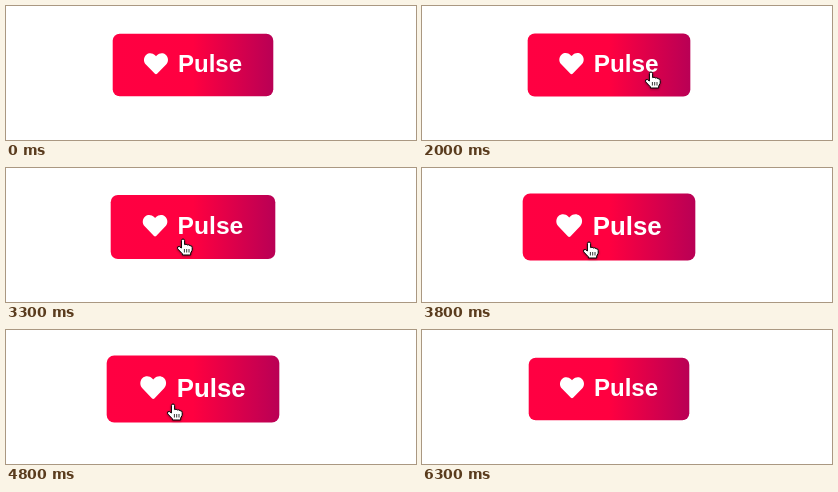
An HTML page that plays this animation: 410x134 px, repeating every 6.8 s.

```html
<!DOCTYPE html>
<html lang="en">
<head>
<meta charset="utf-8">
<title>Pulse button</title>
<style>
  html, body { margin: 0; width: 100%; height: 100%; overflow: hidden; background: #fff; }
  svg { display: block; }
  text { font: bold 24px "Liberation Sans", Arial, sans-serif; fill: #fff; }
</style>
</head>
<body>
<svg width="410" height="134" viewBox="0 0 410 134">
  <defs>
    <linearGradient id="red">
      <stop offset="0" stop-color="#ff0042"/>
      <stop offset=".5" stop-color="#ff0040"/>
      <stop offset="1" stop-color="#b90055"/>
    </linearGradient>
    <filter id="shadow" x="-50%" y="-50%" width="200%" height="200%">
      <feDropShadow dx="0" dy="1" stdDeviation=".8" flood-opacity=".35"/>
    </filter>
  </defs>
  <g id="button">
    <rect x="106.7" y="27.8" width="160.6" height="62.4" rx="7" fill="url(#red)"/>
    <path fill="#fff" transform="translate(138 45.7) scale(.046875)" d="M462.3 62.6C407.5 15.9 326 24.3 275.7 76.2L256 96.5l-19.7-20.3C186.1 24.3 104.5 15.9 49.7 62.6c-62.8 53.6-66.1 149.8-9.9 207.9l193.5 199.8c12.5 12.9 32.8 12.9 45.3 0l193.5-199.8c56.3-58.1 53-154.3-9.8-207.9z"/>
    <text x="172" y="66">Pulse</text>
  </g>
  <g id="arrow" filter="url(#shadow)">
    <path d="M1 1V15.5L4.4 12.3 7 18.3 9.5 17.2 7 11.4H11.5Z" fill="#222" stroke="#fff" stroke-width="2" paint-order="stroke"/>
  </g>
  <g id="hand" filter="url(#shadow)">
    <path d="M-1.6 9V1.6Q-1.6 0 0 0T1.6 1.6V5.6Q3.2 4.6 4.4 6 6 5.2 7 6.7 9.2 6.2 9.2 8.6V11.2L7.7 14V16H-.6V14.8L-5.4 9.8Q-6 7.2-3.8 7.4Z" fill="#fff" stroke="#000" stroke-linejoin="round"/>
    <path d="M1.4 10v3.5M3.7 10v3.5M6 10v3.5" stroke="#000" stroke-width=".8"/>
  </g>
</svg>
<script>
  const LOOP = 6800, STEP = 100;
  const CENTER = { x: 187, y: 59 };
  const POINTER_IN = 700, POINTER_OUT = 6300;
  const HOVER_IN = 1210, HOVER_OUT = 5950;
  const PULSE = 1000, GROWTH = 0.1;

  // Pointer route: time, x, y
  const route = [
    [700, 372, 66], [1100, 284, 78], [1300, 259, 74], [2000, 229, 66],
    [2800, 193, 67], [3600, 167, 73.5], [5500, 167, 73.5], [5600, 160, 77],
    [5700, 150, 75], [5800, 130, 63], [5900, 107, 47], [6100, 54, 13]
  ];
  const [button, arrow, hand] =
    ["button", "arrow", "hand"].map(id => document.getElementById(id));

  const bezier = (a, b, s) =>
    3 * a * s * (1 - s) ** 2 + 3 * b * s * s * (1 - s) + s ** 3;

  // CSS "ease"
  function ease(progress) {
    let low = 0, high = 1;
    for (let i = 0; i < 20; i++) {
      const mid = (low + high) / 2;
      if (bezier(0.25, 0.25, mid) < progress) low = mid; else high = mid;
    }
    return bezier(0.1, 1, low);
  }

  function pulseScale(elapsed) {
    const phase = (elapsed % PULSE) / PULSE * 2;
    return 1 + GROWTH * (phase < 1 ? ease(phase) : 1 - ease(phase - 1));
  }

  function pointerAt(t) {
    const next = route.findIndex(point => point[0] > t);
    if (next < 0) return route.at(-1).slice(1);
    const [t0, x0, y0] = route[Math.max(0, next - 1)];
    const [t1, x1, y1] = route[next];
    const k = t1 > t0 ? (t - t0) / (t1 - t0) : 0;
    return [x0 + (x1 - x0) * k, y0 + (y1 - y0) * k];
  }

  function place(cursor, visible, x, y) {
    cursor.setAttribute("visibility", visible ? "visible" : "hidden");
    cursor.setAttribute("transform", `translate(${Math.round(x)} ${Math.round(y)})`);
  }

  function draw(t) {
    const present = t >= POINTER_IN && t < POINTER_OUT;
    const hovering = t >= HOVER_IN && t < HOVER_OUT;
    const scale = hovering ? pulseScale(t - HOVER_IN) : 1;
    button.setAttribute("transform",
      `translate(${CENTER.x} ${CENTER.y}) scale(${scale}) translate(${-CENTER.x} ${-CENTER.y})`);
    const [x, y] = pointerAt(t);
    place(arrow, present && !hovering, x, y);
    place(hand, hovering, x, y);
  }

  const start = performance.now();
  function tick() {
    const t = (performance.now() - start) % LOOP;
    draw(Math.floor(t / STEP) * STEP);
    requestAnimationFrame(tick);
  }
  tick();
</script>
</body>
</html>
```
